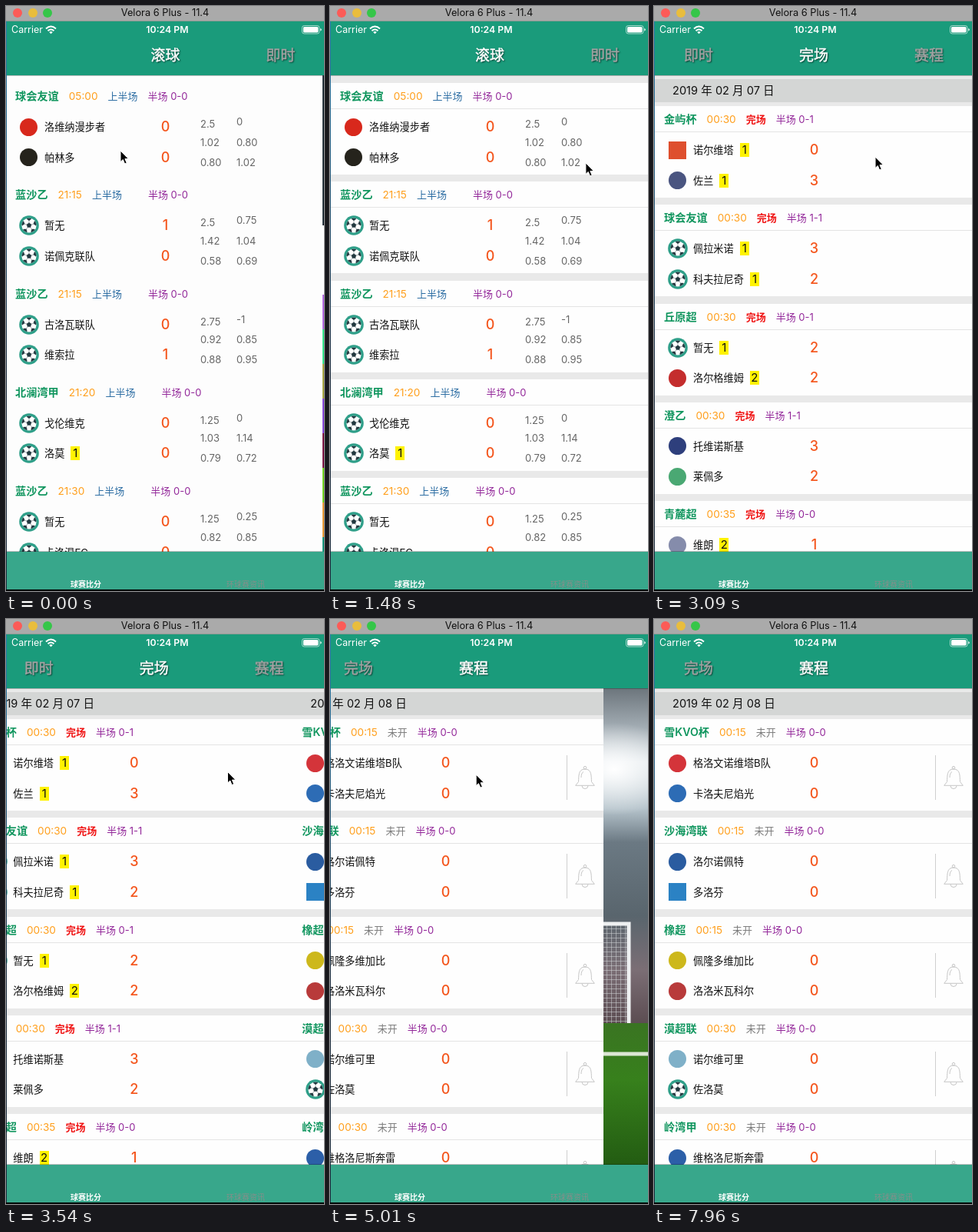
An HTML page for the animation above (8060 ms loop, 414 by 760 pixels).

```html
<!DOCTYPE html>
<html lang="zh-CN">
<head>
<meta charset="utf-8">
<title>Scores</title>
<style>
html, body { margin: 0; width: 100%; height: 100%; overflow: hidden; background: #000 }
body { font: 13.2px/20px Inter, "Noto Sans CJK SC", "Noto Sans CJK", sans-serif; color: #111 }
#stage { position: relative; width: 414px; height: 760px; overflow: hidden }
#stage * { position: absolute; white-space: pre }
#stage .head span { position: static }
.bar { left: 0; width: 414px }
.mid { transform: translate(-50%, -50%) }
#photo { top: 90px; width: 414px; height: 619px }
#view { top: 90px; width: 414px; height: 619px; overflow: hidden }
.page { top: 0; width: 414px; height: 619px; background: #e9e9e9 }
.date { top: 5px; width: 390px; padding-left: 24px; height: 30px; font-size: 14.6px; line-height: 30px; background: #d4d6d5 }
.card { width: 414px; height: 119px; background: #fefefe }
.line { top: 33px; width: 414px; height: 1px; background: #e4e4e4 }
.pale .page, .pale .card { background: #fdfdfd }
.pale .line { background: none }
.head { left: 13px; top: 7px; font-size: 13px }
.head span { margin-right: 13px }
#stage .league { color: #11965f; font-size: 14.2px; font-weight: 600 }
.clock { color: #ff9f1c; font-size: 13.6px }
.live { color: #2c6da3 }
.over { color: #f01414; font-weight: 600 }
.wait { color: #7b7b7b }
.half { color: #93289a }
#stage .minute { color: #f8836f; margin-right: 0 }
.team { left: 51px }
.badge { left: calc(100% + 8px); top: 1px; width: 12px; height: 18px; background: #fff200; font-size: 15px; line-height: 18px; text-align: center }
.score { left: 208.5px; color: #f4561d; font-size: 18px; font-weight: 500 }
.odd { color: #666; font-size: 13px }
.icon { left: 17.5px; width: 26px; height: 26px }
.logo { left: 19px; width: 23px; height: 23px }
.rule { left: 366px; top: 47px; width: 1px; height: 58px; background: #cfcfcf }
.bell { left: 375px; top: 60px; width: 30px; height: 32px; fill: none; stroke: #c6c6c6 }
#nav { top: 20px; height: 70px; background: #1a9b7b; overflow: hidden; color: #fff }
.tab { top: 45px; font-size: 19px; -webkit-text-stroke: .45px; text-shadow: 1px 1px 2px rgba(0,0,0,.75) }
#foot { top: 709px; height: 49px; background: #38a78b; font-size: 10px }
.hair { height: 1px; background: rgba(0,0,0,.25) }
#title { top: 0; height: 19px; background: #aaa; border-bottom: 1px solid #8b9994 }
.light { top: 3px; width: 12px; height: 12px; border-radius: 50% }
#edge { top: 20px; width: 1px; height: 740px; background: linear-gradient(#2b7fae, #1a2a3c 460px) }
#strip { left: 412px; top: 90px; width: 2px; height: 619px; display: none; background: linear-gradient(
  #24313a 195px, #fff 0 285px, #b36ae0 0 330px, #36e58b 0 375px, #a8a643 0 420px,
  #8748d8 0 465px, #7c1745 0 510px, #72d320 0 555px, #e89a35 0 600px, #17947a 0) }
.pale #strip { display: block }
</style>
</head>
<body>
<div id="stage">
  <svg id="photo" viewBox="0 90 414 619">
    <defs>
      <linearGradient id="sky" x2="0" y2="1">
        <stop stop-color="#6c757c"/><stop offset=".12" stop-color="#a4aeb5"/>
        <stop offset=".22" stop-color="#dbe3e8"/><stop offset=".36" stop-color="#b4c2ca"/>
        <stop offset=".46" stop-color="#6b7983"/><stop offset=".68" stop-color="#59656d"/>
        <stop offset=".84" stop-color="#7b6e75"/><stop offset="1" stop-color="#5c4d52"/>
      </linearGradient>
      <linearGradient id="grass" x2="0" y2="1">
        <stop stop-color="#3a7422"/><stop offset=".4" stop-color="#37801c"/><stop offset="1" stop-color="#235c12"/>
      </linearGradient>
      <radialGradient id="glow"><stop stop-color="#fff"/><stop offset="1" stop-color="#fff" stop-opacity="0"/></radialGradient>
      <pattern id="net" width="6" height="6" patternUnits="userSpaceOnUse"><path d="M0 0H6M0 0V6" stroke="#d5d9dc"/></pattern>
      <clipPath id="round"><circle r="9.6"/></clipPath>
      <symbol id="ball" viewBox="-13 -13 26 26">
        <circle r="12.8" fill="#2f9f89"/><circle r="9.6" fill="#fff"/>
        <g id="patches" clip-path="url(#round)" fill="#22383f" stroke="#22383f" stroke-width=".4"></g>
      </symbol>
    </defs>
    <path d="M0 90H414V525H0z" fill="url(#sky)"/>
    <ellipse cx="22" cy="195" rx="70" ry="60" fill="url(#glow)"/>
    <ellipse cx="370" cy="195" rx="90" ry="60" fill="url(#glow)"/>
    <path d="M0 525H414V709H0z" fill="url(#grass)"/>
    <path d="M25 396H389V525H25z" fill="url(#net)"/>
    <path d="M25 525V396H389V525" fill="none" stroke="#eef0f1" stroke-width="5"/>
    <path d="M0 565H414" stroke="#dce6d4" stroke-width="5"/>
  </svg>
  <div id="view"></div>
  <div id="nav" class="bar">
    <span style="left:7px;top:1px;font-size:12.5px">Carrier</span>
    <svg style="left:51px;top:5px" width="15" height="12" fill="none" stroke="#fff" stroke-width="2">
      <path d="M1 4.5Q7.5-1.5 14 4.5M3.5 7.3Q7.5 3.8 11.5 7.3"/><path d="M7.5 11.3L5.2 8.9Q7.5 7.2 9.8 8.9z" fill="#fff" stroke="none"/>
    </svg>
    <span class="mid" style="left:210px;top:11px;font-size:12.3px;font-weight:600">10:24 PM</span>
    <svg style="left:385px;top:5px" width="27" height="12">
      <rect x=".5" y=".5" width="22.5" height="10.5" rx="2.8" fill="none" stroke="#fff" opacity=".6"/>
      <rect x="2" y="2" width="19.5" height="7.5" rx="1.5" fill="#fff"/><path d="M24.3 4v3.5q1.5-.5 1.5-1.75T24.3 4" fill="#fff"/>
    </svg>
  </div>
  <div class="bar hair" style="top:90px"></div>
  <div class="bar hair" style="top:708px"></div>
  <div id="foot" class="bar">
    <span class="mid" style="left:104px;top:42px;color:#fff;font-weight:600">球赛比分</span>
    <span class="mid" style="left:312px;top:42px;color:#868e8a">环球赛资讯</span>
  </div>
  <div id="strip"></div>
  <div id="edge"></div>
  <div class="bar" style="top:758px;height:2px;background:#000"></div>
  <div id="title" class="bar">
    <i class="light" style="left:9px;background:#fc5b57"></i>
    <i class="light" style="left:29px;background:#e9bd3c"></i>
    <i class="light" style="left:48px;background:#35c649"></i>
    <span class="mid" style="left:207px;top:9px;font-size:12.8px">Velora 6 Plus - 11.4</span>
  </div>
  <svg id="cursor" width="14" height="20" viewBox="-1 -1 14 20">
    <path d="M0 0V14.5L3.3 11.5 5.6 17 8.2 15.9 5.9 10.6H10.4z" stroke="#fff"/>
  </svg>
</div>
<script>
const $ = id => document.getElementById(id);
const LOOP = 8060, STEP = 147.4, WIDTH = 414, TAB_GAP = 150;
const tabs = ['滚球', '即时', '完场', '赛程'];

// match: league, clock, status, minute, half score, home, away, odds
// team: name, score, badge, logo colour ('#' circle, 's#' square, none for the ball)
const pages = [
  { kind: 'live', matches: [
    ['球会友谊', '05:00', '上半场', '', '0-0', ['洛维纳漫步者', 0, '', '#d8281c'], ['帕林多', 0, '', '#25231c'], '2.5 0 1.02 0.80 0.80 1.02'],
    ['蓝沙乙', '21:15', '上半场', ' ', '0-0', ['暂无', 1], ['诺佩克联队', 0], '2.5 0.75 1.42 1.04 0.58 0.69'],
    ['蓝沙乙', '21:15', '上半场', ' ', '0-0', ['古洛瓦联队', 0], ['维索拉', 1], '2.75 -1 0.92 0.85 0.88 0.95'],
    ['北澜湾甲', '21:20', '上半场', ' ', '0-0', ['戈伦维克', 0], ['洛莫', 0, 1], '1.25 0 1.03 1.14 0.79 0.72'],
    ['蓝沙乙', '21:30', '上半场', ' ', '0-0', ['暂无', 0], ['卡洛温FC', 0], '1.25 0.25 0.82 0.85'] ] },
  { kind: 'live', matches: [
    ['岚溪超', '20:00', '下半场', '', '0-0', ['瓦伦多佩克', 1], ['佐米诺联', 1]],
    ['球会友谊', '20:15', '下半场', "110'", '0-0', ['卡维隆', 1, 1], ['洛格维奇', 0, 2, '#a5d3e6']],
    ['云泊超', '20:15', '下半场', "110'", '0-1', ['多芙', 0, 2, '#3c4b60'], ['诺格伦独立', 3, 2, '#1b87c9']],
    ['风原青', '20:25', '下半场', "100'", '1-1', ['维洛塔诺青年队', 3, 1], ['索伦帕维可拉青年队', 1]],
    ['球会友谊', '20:30', '下半场', "95'", '0-0', ['罗佩', 0, '', '#b5382a'], ['格罗多维奇诺夫', 0, '', 's#1d559e']] ] },
  { kind: 'over', date: '2019 年 02 月 07 日', matches: [
    ['金屿杯', '00:30', '完场', '', '0-1', ['诺尔维塔', 0, 1, 's#de4f2e'], ['佐兰', 3, 1, '#4a5580']],
    ['球会友谊', '00:30', '完场', '', '1-1', ['佩拉米诺', 3, 1], ['科夫拉尼奇', 2, 1]],
    ['丘原超', '00:30', '完场', '', '0-1', ['暂无', 2, 1], ['洛尔格维姆', 2, 2, '#c42d2d']],
    ['澄乙', '00:30', '完场', '', '1-1', ['托维诺斯基', 3, '', '#2e3f7c'], ['莱佩多', 2, '', '#4aa873']],
    ['青麓超', '00:35', '完场', '', '0-0', ['维朗', 1, 2, '#858cab'], ['暂无', 0]] ] },
  { kind: 'wait', date: '2019 年 02 月 08 日', matches: [
    ['雪KVO杯', '00:15', '未开', '', '0-0', ['格洛文诺维塔B队', 0, '', '#d4343a'], ['卡洛夫尼焰光', 0, '', '#2d6cb5']],
    ['沙海湾联', '00:15', '未开', '', '0-0', ['洛尔诺佩特', 0, '', '#2a5ca0'], ['多洛芬', 0, '', 's#2b82c4']],
    ['橡超', '00:15', '未开', '', '0-0', ['佩隆多维加比', 0, '', '#cdb81c'], ['洛洛米瓦科尔', 0, '', '#b83a3a']],
    ['漠超联', '00:30', '未开', '', '0-0', ['诺尔维可里', 0, '', '#7fb0c8'], ['佐洛莫', 0]],
    ['岭湾甲', '00:30', '未开', '', '0-0', ['维格洛尼斯奔雷', 0, '', '#2c5fa8'], ['暂无', 0]] ] }
];

const bell = `<i class="rule"></i><svg class="bell" viewBox="-15 -16 30 32">
  <circle cy="-12.8" r="1.8"/><path d="M-8.5 5.5C-8 -2 -9 -11 0 -11S8 -2 8.5 5.5L12.3 10.3H-12.3z
  M-4 10.5A4 4 0 0 0 4 10.5M-5 0Q-5 -6 -2 -7.5"/></svg>`;

function teamHTML([name, score, badge, logo], y) {
  const icon = logo
    ? `<i class="logo" style="top:${y - 11.5}px;background:${logo.replace('s', '')};border-radius:${logo[0] == 's' ? 0 : 50}%"></i>`
    : `<svg class="icon" style="top:${y - 13}px"><use href="#ball"/></svg>`;
  return `${icon}<span class="team" style="top:${y - 10}px">${name}${badge ? `<b class="badge" style="font-weight:400">${badge}</b>` : ''}</span>
    <span class="score mid" style="top:${y}px">${score}</span>`;
}

function oddsHTML(odds) {
  return odds.split(' ').map((value, i) => {
    const x = i % 2 ? 301 : 254, y = i == 1 ? 50 : [53, 76.5, 102.5][i >> 1];
    return `<span class="odd" style="left:${x}px;top:${y - 10}px">${value}</span>`;
  }).join('');
}

function cardHTML(kind, [league, clock, status, minute, half, home, away, odds], y) {
  const width = minute == ' ' ? 'display:inline-block;width:21px' : '';
  return `<div class="card" style="top:${y}px"><i class="line"></i><div class="head"><span class="league">${league}</span><span
    class="clock">${clock}</span><span class="${kind}">${status}</span><span class="minute" style="${width}">${minute}</span><span
    class="half">半场 ${half}</span></div>${teamHTML(home, 57)}${teamHTML(away, 96.5)}${odds ? oddsHTML(odds) : ''}${kind == 'wait' ? bell : ''}</div>`;
}

$('view').innerHTML = pages.map(({ kind, date, matches }) => `<div class="page">${date ? `<div class="date">${date}</div>` : ''}${
  matches.map((m, i) => cardHTML(kind, m, (date ? 40 : 10) + i * 128.33)).join('')}</div>`).join('');
$('nav').insertAdjacentHTML('beforeend', tabs.map(name => `<span class="tab mid">${name}</span>`).join(''));

const pentagon = (x, y, r, turn) => '<polygon points="' + [0, 1, 2, 3, 4].map(i => {
  const a = turn + i * Math.PI * .4;
  return [x + r * Math.sin(a), y - r * Math.cos(a)].map(v => v.toFixed(2));
}).join(' ') + '"/>';
$('patches').innerHTML = pentagon(0, 0, 3.2, 0) + [0, 1, 2, 3, 4].map(i => {
  const a = i * Math.PI * .4, x = Math.sin(a), y = -Math.cos(a);
  return pentagon(x * 9.2, y * 9.2, 3, a + Math.PI) + `<path d="M0 0L${x * 8} ${y * 8}"/>`;
}).join('');

// [time, scroll]
const scrollKeys = [[0, 1], [140, 1], [730, -48], [900, -48], [1250, 0], [1480, 0], [2150, 414], [2430, 414],
  [3050, 828], [3400, 828], [4100, 1242], [4500, 1242], [4900, 1300], [5060, 1300], [5500, 1242], [LOOP, 1242]];
// [time, x, y]
const cursorKeys = [[0, 149, 188], [140, 149, 188], [730, 211, 214], [900, 211, 214], [1440, 335, 204], [1920, 190, 198],
  [2205, 267, 196], [2430, 315, 198], [2800, 180, 198], [3090, 288, 196], [3400, 325, 198], [3820, 180, 200],
  [4120, 250, 198], [4500, 310, 200], [4900, 180, 202], [5400, 260, 203], [6180, 382, 207], [6300, 382, 207],
  [6780, 340, 405], [6930, 330, 430], [7780, 300, 770], [LOOP, 300, 770]];

function sample(keys, t) {
  const i = keys.findIndex(k => k[0] > t), a = keys[i - 1], b = keys[i];
  const u = (t - a[0]) / (b[0] - a[0]), e = u * u * (3 - 2 * u);
  return a.slice(1).map((v, j) => v + (b[j + 1] - v) * e);
}

const pageEls = document.querySelectorAll('.page'), tabEls = document.querySelectorAll('.tab');

function draw(now) {
  // the picture advances about seven times a second
  const t = Math.floor((now % LOOP + 8) / STEP) * STEP;
  const [scroll] = sample(scrollKeys, t), [x, y] = sample(cursorKeys, t);
  const at = scroll / WIDTH;
  $('stage').className = t < 140 ? 'pale' : '';
  pageEls.forEach((el, i) => el.style.left = i * WIDTH - scroll + 'px');
  tabEls.forEach((el, i) => {
    el.style.left = 208 + (i - at) * TAB_GAP + 'px';
    el.style.color = Math.abs(i - at) < .5 ? '#fff' : '#a2a2a2';
  });
  $('cursor').style.transform = `translate(${x - 1}px,${y - 1}px)`;
  requestAnimationFrame(draw);
}
draw(0);
</script>
</body>
</html>
```
